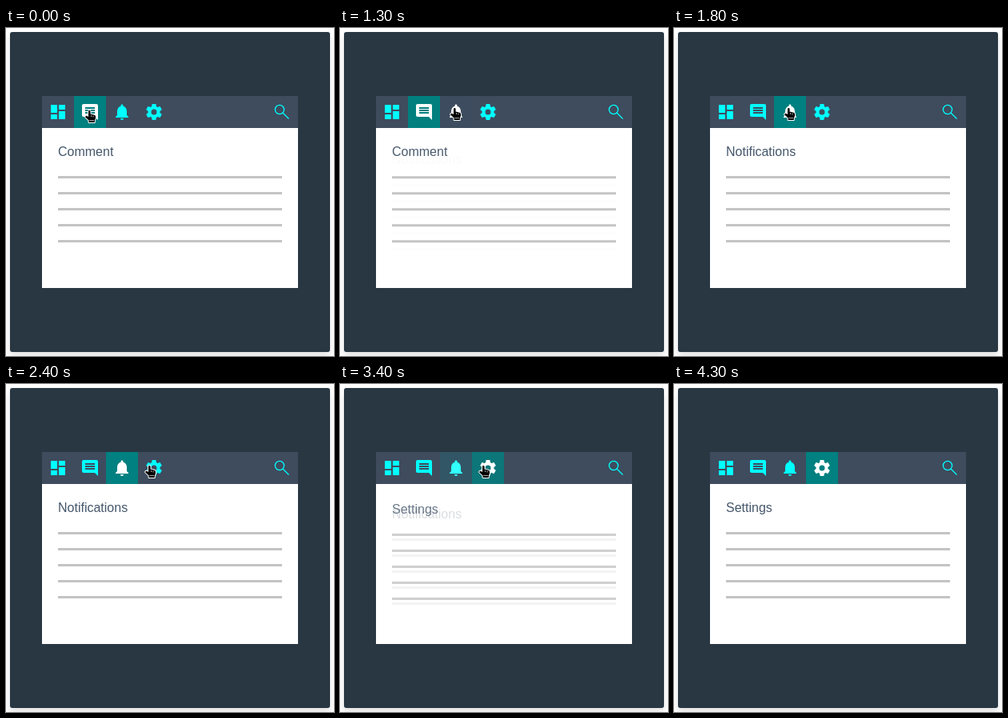
These frames come from a looping animation (410 px wide and 410 px high, 4.9 s). An HTML page:

```html
<!DOCTYPE html>
<html lang="en">
<head>
<meta charset="utf-8">
<title>Tab bar</title>
<style>
  html, body { margin: 0; width: 100%; height: 100%; overflow: hidden; background: #fff; }
  .card {
    position: absolute; left: 5px; top: 5px; width: 400px; height: 400px;
    border-radius: 3px; background: #283742;
    box-shadow: 0 5px 10px rgba(0, 0, 0, .12);
  }
  svg { position: absolute; left: 0; top: 0; display: block; }
  text { font: 16px "Liberation Sans", Arial, sans-serif; fill: #44566a; }
  .icon { fill: currentColor; color: #0ff; }
  .cursor { fill: #000; stroke: #fff; stroke-width: 2; stroke-linejoin: round; paint-order: stroke; }
</style>
</head>
<body>
<div class="card"></div>
<svg width="410" height="410" viewBox="0 0 410 410">
  <rect x="45" y="125" width="320" height="200" fill="#fff"/>
  <rect x="45" y="85" width="320" height="40" fill="#3e4c5e"/>
  <g id="tabs"></g>
  <g class="icon" transform="translate(53 93)">
    <path d="M3 13h8V3H3zM3 21h8v-6H3zM13 21h8V11h-8zM13 3v6h8V3z"/>
  </g>
  <g class="icon" id="comment" transform="translate(93 93)">
    <path d="M22 4c0-1.1-.9-2-2-2H4c-1.1 0-2 .9-2 2v12c0 1.1.9 2 2 2h14l4 4zM18 14H6v-2h12zM18 11H6V9h12zM18 8H6V6h12z" fill-rule="evenodd"/>
  </g>
  <g class="icon" id="bell" transform="translate(133 93)">
    <path d="M12 22c1.1 0 2-.9 2-2h-4c0 1.1.9 2 2 2zM18 16v-5c0-3.07-1.64-5.64-4.5-6.32V4c0-.83-.67-1.5-1.5-1.5s-1.5.67-1.5 1.5v.68C7.63 5.36 6 7.92 6 11v5l-2 2v1h16v-1z"/>
  </g>
  <g class="icon" id="gear" transform="translate(185 105)">
    <circle r="5.5" fill="none" stroke="currentColor" stroke-width="4"/>
  </g>
  <g fill="none" stroke="#0ff" stroke-width="1.3">
    <circle cx="342" cy="102" r="5.6"/>
    <path d="M346 106l7.5 7.5"/>
  </g>
  <g id="pages"></g>
  <g id="hand" class="cursor">
    <path d="M5 9V2.4a1.3 1.3 0 0 1 2.6 0V5.6L12.6 6.8Q14 7.2 14 8.6V11L12.8 13.4V16H5.6V13.6L1.2 9.4Q1 7.6 2.8 7.8z"/>
    <path d="M8.6 7v2M11 7.5v2M6.4 13.6h5.6" stroke-width=".7"/>
  </g>
  <path id="arrow" class="cursor" d="M1 1V16L4.5 12.8L7 18.6L9.4 17.6L6.9 12H11.8z"/>
</svg>
<script>
const LOOP = 4900, STEP = 100;
const byId = id => document.getElementById(id);

function add(parent, tag, attrs, text) {
  const el = document.createElementNS('http://www.w3.org/2000/svg', tag);
  for (const key in attrs) el.setAttribute(key, attrs[key]);
  if (text) el.textContent = text;
  return parent.appendChild(el);
}

for (let k = 0; k < 6; k++) {
  add(byId('gear'), 'path', {
    d: 'M-2.9-5.5V-6.9L-2.5-9.6Q-2.4-10-2-10H2Q2.4-10 2.5-9.6L2.9-6.9V-5.5z',
    transform: `rotate(${k * 60})`
  });
}

const tabs = [['comment', 'Comment'], ['bell', 'Notifications'], ['gear', 'Settings']].map(([id, title], i) => {
  const back = add(byId('tabs'), 'rect', { x: 85 + 40 * i, y: 85, width: 40, height: 40, fill: '#008080' });
  const page = add(byId('pages'), 'g');
  add(page, 'text', { x: 65, y: 160 }, title);
  for (let n = 0; n < 5; n++) {
    add(page, 'rect', { x: 65, y: 185 + 20 * n, width: 280, height: 3, fill: '#c4c4c4' });
  }
  return { icon: byId(id), back, page };
});

const clamp = u => Math.min(1, Math.max(0, u));
const mix = (a, b, u) => a + (b - a) * u;
const smooth = u => u * u * (3 - 2 * u);

// cubic-bezier(.25, .1, .25, 1)
function ease(u) {
  if (u <= 0 || u >= 1) return clamp(u);
  const curve = (a, b, s) => 3 * a * s * (1 - s) ** 2 + 3 * b * s * s * (1 - s) + s ** 3;
  let lo = 0, hi = 1;
  for (let i = 0; i < 24; i++) {
    const mid = (lo + hi) / 2;
    if (curve(.25, .25, mid) < u) lo = mid; else hi = mid;
  }
  return curve(.1, 1, lo);
}

const ramp = (t, start, length) => ease((t - start) / length);

function handPlace(t) {
  const glide = (start, a, b) => {
    const u = smooth(clamp((t - start) / 500));
    return [mix(a[0], b[0], u), mix(a[1], b[1], u)];
  };
  if (t < 1000) return glide(100, [98, 102], [135, 98]);
  if (t < 3900) return glide(1900, [137, 99], [173, 101]);
  return [140, 91];
}

function draw(t) {
  const first = ramp(t, 1280, 500), second = ramp(t, 3150, 500);
  const picked = [1 - first, first - second, second];
  const hover = [0, t < 2000 ? ramp(t, 520, 200) : 0, ramp(t, 2420, 200)];

  tabs.forEach(({ icon, back, page }, i) => {
    const p = picked[i];
    back.setAttribute('opacity', p);
    page.setAttribute('opacity', p);
    page.setAttribute('transform', `translate(0 ${10 * (1 - p)})`);
    icon.style.color = `rgb(${Math.round(255 * Math.max(p, hover[i]))}, 255, 255)`;
  });

  const show = (id, on, x, y) => {
    byId(id).setAttribute('visibility', on ? 'visible' : 'hidden');
    byId(id).setAttribute('transform', `translate(${Math.round(x)} ${Math.round(y)})`);
  };
  show('hand', t < 4100, ...handPlace(t));
  show('arrow', t >= 4100 && t < 4300, 47, 10);
}

function tick() {
  const t = performance.now() % LOOP;
  draw(Math.floor(t / STEP) * STEP);
  requestAnimationFrame(tick);
}
tick();
</script>
</body>
</html>
```
